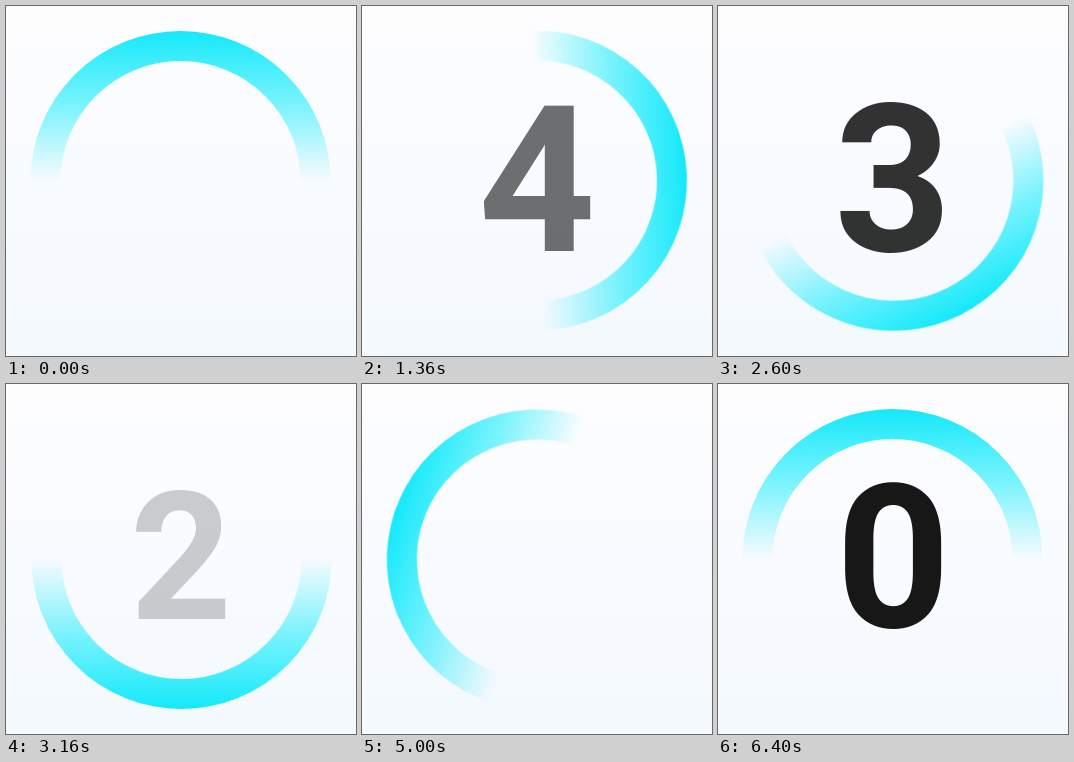
Animation of 350x350 px, one loop 6440 ms. Source, as an HTML page:

```html
<!DOCTYPE html>
<html lang="en">
<head>
<meta charset="utf-8">
<title>Countdown</title>
<style>
  html, body { margin: 0; width: 100%; height: 100%; overflow: hidden; }
  body { position: relative; background: linear-gradient(#fdfdfe, #f8fbff 50%, #f4f9fd); }

  svg, .digit { position: absolute; left: 0; top: 0; width: 350px; height: 350px; }

  .ring {
    transform-origin: 175px 175px;
    animation: turn 6.44s infinite;
  }

  .digit {
    font: 700 200px/350px Roboto, Arial, sans-serif;
    text-align: center;
    color: #171717;
    animation: fade 6.44s infinite, pop 6.44s infinite, show 6.44s step-end infinite;
    animation-delay: calc(var(--i) * 1s - 6.44s);
  }
  .digit.last { animation-name: fade, pop, show-last; }

  /* eight eased eighth-turns of 800 ms, then a 40 ms rest */
  @keyframes turn {
    0% { transform: rotate(0deg); }
    12.4224% { transform: rotate(45deg); }
    24.8447% { transform: rotate(90deg); }
    37.2671% { transform: rotate(135deg); }
    49.6894% { transform: rotate(180deg); }
    62.1118% { transform: rotate(225deg); }
    74.5342% { transform: rotate(270deg); }
    86.9565% { transform: rotate(315deg); }
    99.3789%, 100% { transform: rotate(360deg); }
  }

  /* each digit takes one second to arrive */
  @keyframes fade {
    0% { opacity: 0; }
    15.528%, 100% { opacity: 1; }
  }
  @keyframes pop {
    0% { transform: scale(.7); }
    7.764% { transform: scale(1.04); }
    15.528%, 100% { transform: scale(1); }
  }
  @keyframes show {
    0% { visibility: visible; }
    15.527%, 100% { visibility: hidden; }
  }
  @keyframes show-last {
    0% { visibility: visible; }
    22.36%, 100% { visibility: hidden; }
  }
</style>
</head>
<body>
<svg viewBox="0 0 350 350">
  <defs>
    <linearGradient id="glow" gradientUnits="userSpaceOnUse" x1="0" y1="25" x2="0" y2="175">
      <stop offset="0" stop-color="#14e8fa"/>
      <stop offset=".5" stop-color="#14ecfc" stop-opacity=".55"/>
      <stop offset="1" stop-color="#14ecfc" stop-opacity="0"/>
    </linearGradient>
  </defs>
  <path class="ring" d="M39.5 175a135 135 0 0 1 270 0" fill="none" stroke="url(#glow)" stroke-width="30"/>
</svg>
<div class="digit" style="--i:0">5</div>
<div class="digit" style="--i:1">4</div>
<div class="digit" style="--i:2">3</div>
<div class="digit" style="--i:3">2</div>
<div class="digit" style="--i:4">1</div>
<div class="digit last" style="--i:5">0</div>
</body>
</html>
```
